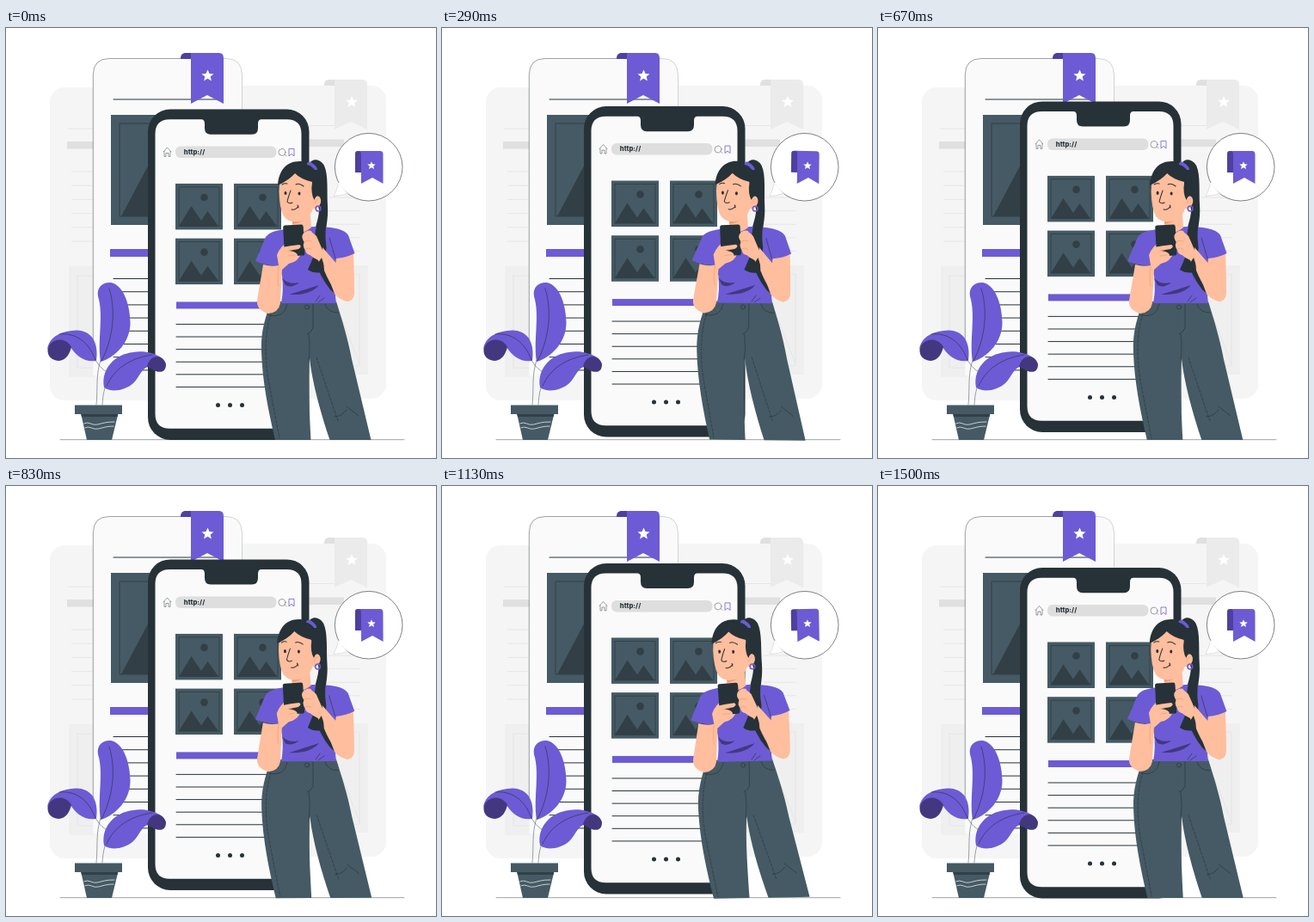
An HTML page for the animation above (1540 ms loop, 500 px wide and 500 px high).

```html
<!DOCTYPE html>
<html lang="en">
<head>
<meta charset="utf-8">
<title>Bookmarks</title>
<style>
  html, body { margin: 0; width: 100%; height: 100%; overflow: hidden; background: #fff; }
  svg { display: block; width: 100%; height: 100%; }
  .dark { fill: #263238; }
  .slate { fill: #455a64; }
  .shade { fill: #323f46; }
  .purple { fill: #6c5bd4; }
  .deep { fill: #43387f; }
  .fold { fill: #4d40a0; }
  .skin { fill: #ffbe9d; }
  .paper { fill: #fafafa; }
  .line { fill: none; stroke: #263238; stroke-width: .6; stroke-linecap: round; }
  .fine { stroke-width: .45; }
  .rule { stroke-width: 1; }
  .crease { stroke: #eb996e; }
  .pale { fill: none; stroke: #e2e2e2; stroke-width: .8; }
  text { font: 800 7.7px Inter, sans-serif; }
</style>
</head>
<body>
<svg viewBox="0 0 500 500">
  <defs>
    <path id="star" d="M0-7 2-2.4 7-2.1 3.2 1.1 4.4 6 0 3.3-4.4 6-3.2 1.1-7-2.1-2-2.4Z" fill="#fff"/>
    <g id="thumb">
      <rect class="slate" width="55" height="53.500"/>
      <rect class="line" x="4" y="4" width="47" height="45.500"/>
      <circle class="shade" cx="33.500" cy="16" r="4.300"/>
      <path class="shade" d="M4 49.500 18.500 26 30 43 37.500 32 50 49.500Z"/>
    </g>
  </defs>

  <!-- pages behind -->
  <g fill="#f5f5f5">
    <rect x="51" y="69" width="170" height="364" rx="17"/>
    <rect x="262" y="67" width="180" height="364" rx="17"/>
  </g>
  <path fill="#e0e0e0" d="M71 132h32v8.500H71ZM345 129.500h48v8.500H345ZM370 67c0-5 2-7 6-7h10v7Z"/>
  <path fill="#ebebeb" d="M382 60h33q5 0 5 6v52l-19-9-19 9Z"/>
  <use href="#star" x="402" y="86"/>
  <path fill="#efefef" d="M73 277h30v129H73ZM345 276h76v127h-76Z"/>
  <path class="pale" d="M103 288H83v107h20M380 286h31v107h-31M391 340l20 50M72 117h30M275 113.500h107"/>
  <path id="paleLines" class="pale"/>
  <path class="line fine" d="M63 478.700H463"/>

  <!-- tall page -->
  <path class="paper" d="M101.300 54.500q0-19 19-19h135.500q18.700 0 18.700 19v350H101.300Z"/>
  <path class="line fine" d="M101.300 385V54.500q0-19 19-19h83"/>
  <path d="M253 35.500h3q18 0 18.500 19v40" fill="none" stroke="#b5b9bb" stroke-width=".6"/>
  <path class="line rule" d="M125 83H245"/>
  <rect class="slate" x="122" y="101" width="60" height="128"/>
  <path class="line" d="M170 111H132V219H170"/>
  <path class="shade" d="M134 219 170 151V219Z"/>
  <rect class="purple" x="121" y="257" width="60" height="9"/>
  <path id="pageLines" class="line rule"/>
  <path class="fold" d="M203 36c0-5 2-7 6-7h10v7Z"/>
  <path class="purple" d="M215 29h33q5 0 5 6v53l-19-10-19 10Z"/>
  <use href="#star" x="234.500" y="55.500"/>

  <!-- big phone -->
  <g id="phone">
    <rect class="dark" x="165" y="94.500" width="187.500" height="384.500" rx="26"/>
    <path class="paper" d="M190.500 106.200h36.500q4 0 4 5v5q0 7.500 7 7.500h48q7 0 7-7.500v-5q0-5 4-5h29.500q17 0 17 17v325.600q0 17-17 17H190.500q-17 0-17-17v-325.600q0-17 17-17Z"/>
    <rect x="197" y="137.500" width="117.500" height="13.500" rx="6" fill="#dedede"/>
    <text x="206.800" y="146.700" class="dark">http://</text>
    <path class="line fine" d="M183 144l4.500-5 4.500 5M184 143.500v6h2v-4h3v4h2v-6M324 147l2 2"/>
    <circle class="line fine" cx="321" cy="144.500" r="4"/>
    <path fill="none" stroke="#6c5bd4" stroke-width=".8" d="M329 140.500h6v8.500l-3-2.500-3 2.500Z"/>
    <use href="#thumb" x="197" y="181"/>
    <use href="#thumb" x="265" y="181"/>
    <use href="#thumb" x="197" y="244.700"/>
    <use href="#thumb" x="265" y="244.700"/>
    <rect class="purple" x="198" y="318.500" width="120" height="8"/>
    <path id="phoneLines" class="line rule"/>
    <g class="dark">
      <circle cx="246.500" cy="438.500" r="2.500"/>
      <circle cx="260.500" cy="438.500" r="2.500"/>
      <circle cx="274.500" cy="438.500" r="2.500"/>
    </g>
  </g>

  <!-- plant -->
  <path class="line fine" d="M110 386C104 405 107 420 105 438M103 384C109 396 114 397 118 401M125 404C114 413 113 425 112 438"/>
  <path class="purple" d="M110 388C106 362 114 335 107 312 105 300 114 295 122 296 137 299 144 322 144.500 342 145 364 128 383 110 388Z"/>
  <path class="line" d="M120 303C129 332 123 365 111 387"/>
  <path class="purple" d="M48 374C50 358 66 352 82 351.500 100 352 108 366 105 387 90 389 81 380 75 371 68 360 54 362 48 374Z"/>
  <path class="deep" d="M48.500 374C51 361 69 358 76 371 74 379 70 386 62 387 54 387 48 382 48.500 374Z"/>
  <path class="line" d="M62 356C80 354 96 364 104 386"/>
  <path class="purple" d="M114 418C110 395 128 379 148 377 166 374 184 382 186 391 180 384 168 386 165 394 158 395 154 408 148 413 138 422 122 424 114 418Z"/>
  <path class="deep" d="M164 394C167 379 182 378 186 391 186 400 180 401 174 399 170 397 167 395 164 394Z"/>
  <path class="line" d="M117 416C126 396 144 384 170 380"/>
  <path class="slate" d="M87 448H130.500L123 479H94Z"/>
  <path class="shade" d="M87 448H130.500L129.500 452H88Z"/>
  <rect class="slate" x="80" y="438.500" width="55" height="10.500"/>
  <path fill="none" stroke="#fff" stroke-width=".7" d="M90.500 460q4-2 8 0t8 1 8-2 12-1M91.500 465q4-2 8 0t8 1 8-2 10-1"/>

  <!-- speech bubble -->
  <circle cx="421.700" cy="161.700" r="39.300" fill="#fff" stroke="#263238" stroke-width=".6"/>
  <path d="M386.500 180Q385 188 381 195.500 390 195 397 192.500" fill="#fff" stroke="#b5b9bb" stroke-width=".4"/>
  <path fill="#fff" d="M386 180l14-2-2 15Z"/>
  <g id="mark">
    <path class="fold" d="M406 168V146q0-3 3-3h6v25Z"/>
    <path class="purple" d="M410 143h25q3.500 0 3.500 4v34l-12.500-7-13 7V147q0-4-3-4Z"/>
    <use href="#star" transform="translate(425 160) scale(.68)"/>
  </g>

  <!-- woman -->
  <g id="woman">
    <path class="dark" d="M352 160C354 151 365 151 370 160 375 171 373 190 374 207 375 224 371 232 372 244 376 258 370 265 369 284 362 286 355 285 351 281 356 270 360 254 358 244 358 234 364 222 364 211L358 190Z"/>
    <path class="slate" d="M308 318H384C389 334 397 358 402 385L424.500 479H376.500C366 448 356 412 353 384 351 412 353 448 354.500 479H313C305 445 298 410 297 376 296 352 302 336 308 318Z"/>
    <path class="line" d="M306 334q18 4 21-13M357 321V349Q355 354 350 356M371 321q3 10 15 10M352 356Q354 372 352 386M382 452q8 0 14-8M410 451l-14-11"/>
    <path class="line" stroke-dasharray="3 2" d="M308 333C300 355 301 390 306 414L318 477M361 383 386 457"/>
    <circle class="line" cx="350" cy="324.500" r="2.500"/>
    <path class="skin" d="M384 260 404 262Q405 290 405 309 404 318 396 318 382 309 362 277L372 262Z"/>
    <path class="purple" d="M331 233C318 235 307 236 302 243L290 271Q303 277 317 276L321 288Q323 305 320 320H384C382 304 382 282 384 268Q396 267 405.500 262L398 241C393 233 377 231 358 231Z"/>
    <path class="skin" d="M333 217V234Q343 242 355 232L353 208Z"/>
    <path fill="#eb996e" d="M333 224Q345 222 350 214 349 226 333 228Z"/>
    <path class="dark" d="M361 230 372 231Q371 243 372 250 374 260 369 270 370 278 368 284 358 286 351 281 359 263 361 255 357 248 361 230Z"/>
    <path class="deep" d="M321 291q8 8 20 5-9 7-16 3ZM329 310q16-5 35-11-10 12-34 11Z"/>
    <path class="line" d="M360 318l5-7M363 319l7-5M376 244l7 24"/>
    <path class="skin" d="M299 275Q309 278 317 276L315 264Q319 253 330 247L345 252 343 262Q340 272 329 274L321 281 319 320Q317 331 305 332 291 328 292 317Z"/>
    <path class="line crease" d="M317 277Q315 292 317 300"/>
    <path class="skin" d="M346 238Q354 234 361 242L368 258 392 282 403 300Q407 314 397 318 381 315 372 292L363 270Q350 264 346 254Z"/>
    <path class="dark" d="M367 267Q371 280 382 309 371 300 361 276Z"/>
    <path class="skin" d="M368 255 398 290Q404 312 397 318 381 309 370 282Z"/>
    <rect class="dark" x="323" y="229" width="23.500" height="36" rx="2.500" transform="rotate(-3 335 247)"/>
    <path class="skin" d="M321 255Q331 253 341 252 345 254 340 257L329 259Q338 260 339 264 338 270 326 273L317 269ZM345 240q5-6 10-4l4 10-2 18q-8 1-9-6-4-5-1-9-4-5-2-9Z"/>
    <path class="line crease" d="M328 259l9-2M328 265l8-1M347 248q4-2 8 0M348 257q4-2 7 0"/>

    <path class="skin" d="M318.500 175Q329 163 354 172L359 195Q367 194 366 203 363 212 357 210 353 221 344 224.500 330 228 323 219 318 210 317.500 190Z"/>
    <path class="dark" d="M316 183C317 165 327 154 343 155 360 156 367 175 366 196Q361 193 358.500 200 354 193 356 179 343 176 336 169 329 177 316 183Z"/>
    <path class="purple" d="M350 157q3-3 6 0 6 4 6 8l-3 0q-5-6-9-6Z"/>
    <path class="line rule" d="M331 189Q328 197 327 202 329 205 333 203M321 182q3-2 6-1M337 182q4-2 9 2"/>
    <path class="line rule" d="M332 211q5 1 8-4M339 206l1 3"/>
    <ellipse class="dark" cx="325" cy="192" rx="1.500" ry="2.100"/>
    <ellipse class="dark" cx="341" cy="192.500" rx="1.500" ry="2.100"/>
    <path class="line crease" d="M359 204q1-5 4-5"/>
    <circle cx="363" cy="210" r="2.900" fill="none" stroke="#6c5bd4" stroke-width="1.500"/>
  </g>
</svg>
<script>
  const LOOP = 1540, STEPS = 37;
  const byId = id => document.getElementById(id);

  // Evenly spaced horizontal rules.
  const rules = (x, y, width, gap, count) =>
    Array.from({ length: count }, (_, i) => `M${x} ${y + i * gap}h${width}`).join('');

  byId('paleLines').setAttribute('d', rules(76, 167, 25, 16.2, 6) + rules(374, 197, 38, 15.6, 5));
  byId('pageLines').setAttribute('d', rules(125, 291.500, 45, 15.2, 8));
  byId('phoneLines').setAttribute('d', rules(198, 344.500, 105, 14.6, 6));

  // Triangle wave: 1 at phase 0, -1 at phase 0.5.
  const triangle = phase => Math.abs(4 * (phase - Math.floor(phase)) - 2) - 1;

  function draw(now) {
    const step = Math.floor((now % LOOP) / LOOP * STEPS);
    const phase = (step + 1) / STEPS;
    const lift = 5.23 * (triangle(phase) - 1) + 0.5;
    const sway = triangle(phase - 0.25) - 0.1;
    byId('phone').setAttribute('transform', `translate(0 ${lift})`);
    byId('woman').setAttribute('transform', `rotate(${sway} 358 316)`);
    byId('mark').setAttribute('transform', `rotate(${sway} 422 162)`);
    requestAnimationFrame(() => draw(performance.now()));
  }
  draw(0);
</script>
</body>
</html>
```
